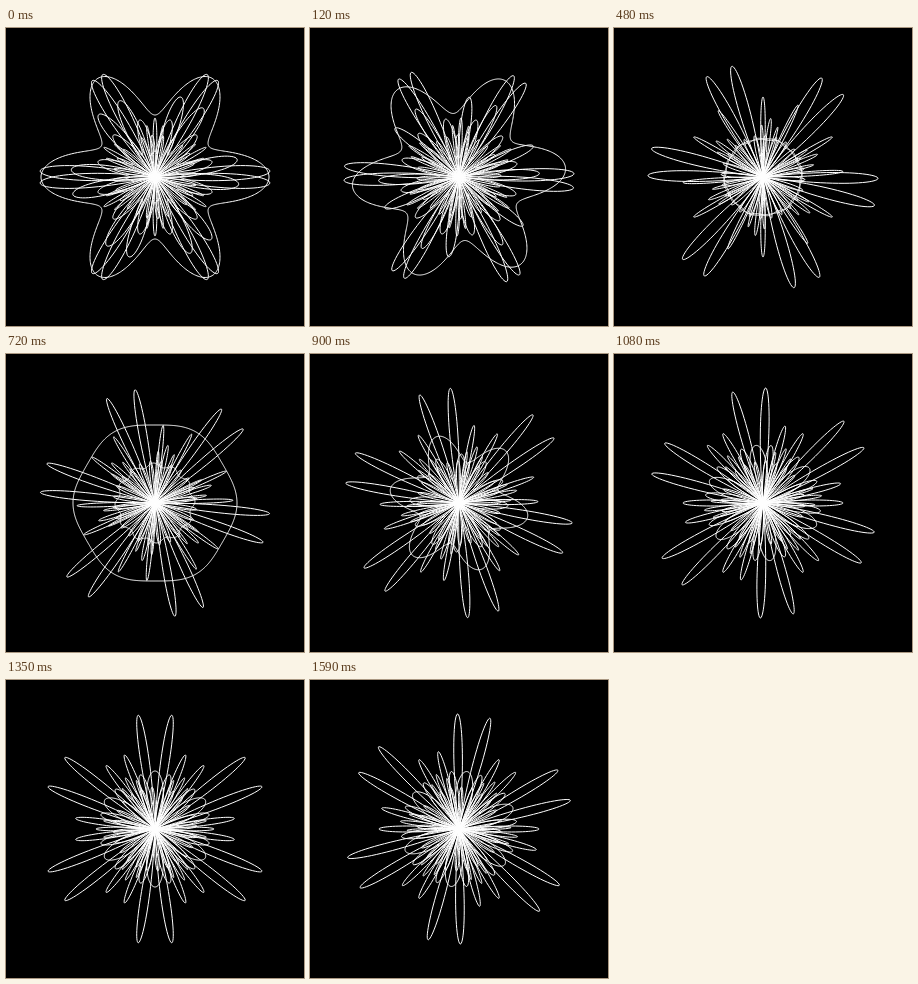
Write an HTML page with a canvas that moves like this. It is 298 px wide and 298 px high and loops after 1620 ms.

```html
<!DOCTYPE html>
<html>
<head>
<meta charset="utf-8">
<style>
  html, body { margin: 0; height: 100%; overflow: hidden; background: #000; }
  canvas { display: block; }
</style>
</head>
<body>
<canvas id="stage" width="298" height="298"></canvas>
<script>
const ctx = document.getElementById('stage').getContext('2d');
const STEP = 30, STEPS = 54, CENTER = 149, RAD = Math.PI / 180;

// Each track is sampled at these steps and joined linearly; angles in degrees.
const keys = [0, 9, 16, 24, 36, 45, 53];
const tracks = {
  leadAngle:  [3, 0, -0.7, -5.3, -14.7, -21.6, -29.3],
  trailAngle: [-3, -8.5, -14.3, -20, -31.3, -38.4, -45.6],
  mainWidth:  [10, 6.5, 7.5, 5.5, 6, 6, 6],
  sideLead:   [12, 36, 30, 24, 14, 7.6, 0],
  sideTrail:  [-5, 12, 4, 2, 0, -7.6, -15],
  sideLength: [84, 76, 80, 78, 80, 80, 80],
  sideWidth:  [14, 5, 4.5, 4, 6, 6, 6],
  bandMean:   [88, 82, 38.5, 80, 31, 31, 31],
  bandWave:   [26, 16, 0.8, 2, 27, 27, 27],
  bandAngle:  [0, 11, 8, 0, -23, -30, -38],
  ringMean:   [42, 36, 38, 38, 30, 34, 30],
  ringWave:   [17, 24, 1, 2, 28, 22, 28]
};

function sample(values, step) {
  let i = 0;
  while (i < keys.length - 2 && step > keys[i + 1]) i++;
  const f = (step - keys[i]) / (keys[i + 1] - keys[i]);
  return values[i] + (values[i + 1] - values[i]) * f;
}

function polar(radius, from, to, increment) {
  for (let a = from; a <= to + 1e-6; a += increment) {
    const r = radius(a);
    ctx.lineTo(CENTER + r * Math.cos(a * RAD), CENTER - r * Math.sin(a * RAD));
  }
}

function petals(angle, length, width) {
  for (let k = 0; k < 6; k++) {
    const mid = angle + 60 * k;
    ctx.moveTo(CENTER, CENTER);
    polar(a => length * Math.cos((a - mid) / width * Math.PI / 2),
      mid - width, mid + width, width / 24);
  }
}

function loop(radius) {
  ctx.moveTo(CENTER + radius(0), CENTER);
  polar(radius, 0, 360, 0.5);
}

const wave = (mean, swing, count, phase) =>
  a => mean + swing * Math.cos(count * (a - phase) * RAD);

function draw(step) {
  const s = {};
  for (const name in tracks) s[name] = sample(tracks[name], step);
  const axis = (s.leadAngle + s.trailAngle) / 2;

  ctx.fillStyle = '#000';
  ctx.fillRect(0, 0, 298, 298);
  ctx.strokeStyle = '#fff';
  ctx.lineWidth = 1;
  ctx.lineJoin = 'round';
  ctx.beginPath();

  petals(s.leadAngle, 115, s.mainWidth);
  petals(s.trailAngle, 115, s.mainWidth);
  petals(s.sideLead, s.sideLength, s.sideWidth);
  petals(s.sideTrail, s.sideLength, s.sideWidth);

  loop(wave(s.bandMean, s.bandWave, 6, s.bandAngle));
  loop(wave(s.ringMean, s.ringWave, 12, axis + 15));

  // Inner star of short, fine petals.
  petals(axis + 30, 59, 5);
  petals(axis + 21, 52, 4);
  petals(axis + 39, 52, 4);
  loop(wave(0, 42, 12, axis + 4));

  ctx.stroke();
}

function frame(now) {
  draw(Math.floor(now / STEP) % STEPS);
  requestAnimationFrame(frame);
}
frame(performance.now());
</script>
</body>
</html>
```
